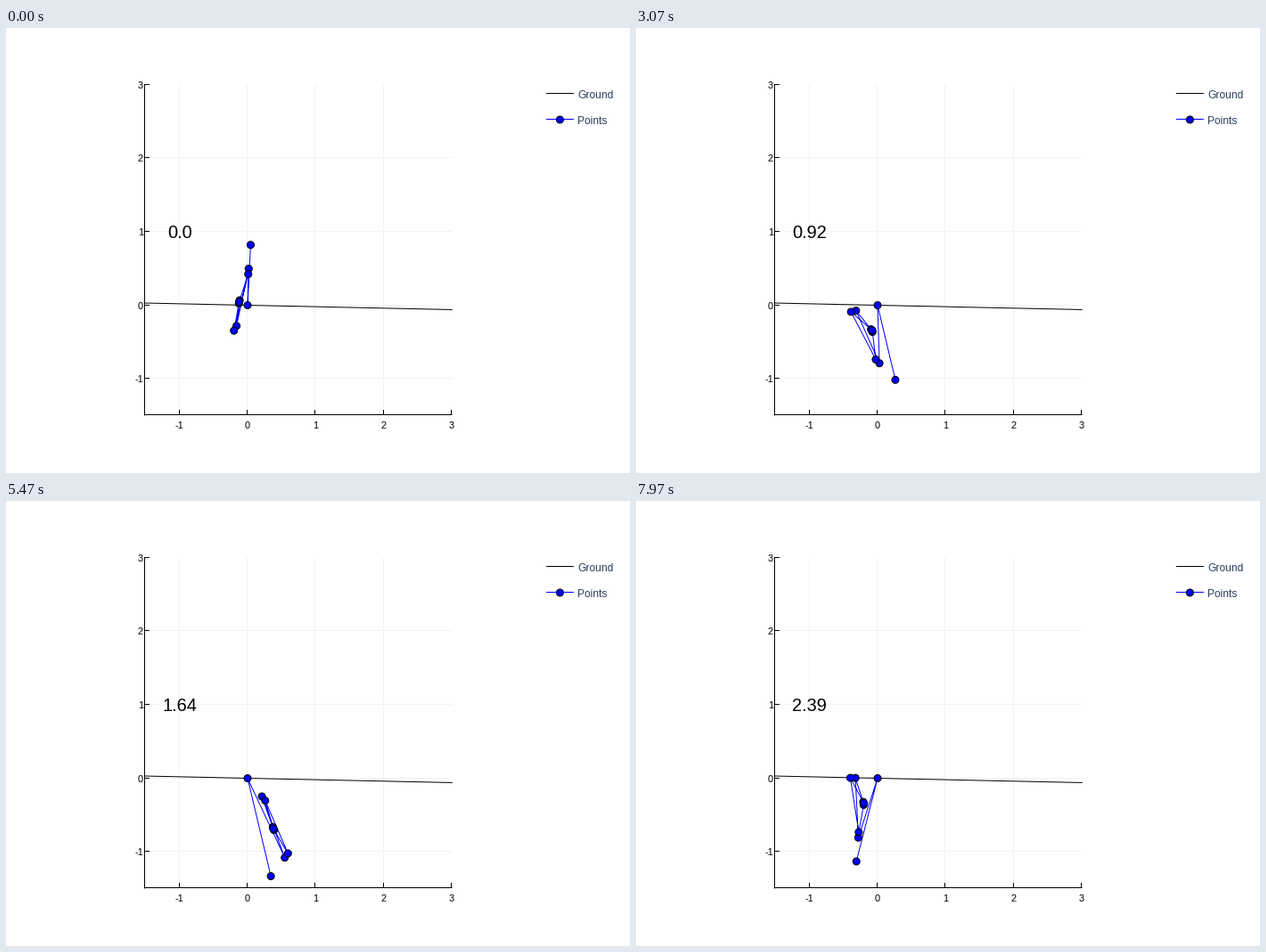
Animation, 700 px wide and 500 px high, one loop 8000 ms. Source, as a matplotlib script:

```python
import numpy as np
import matplotlib.pyplot as plt
from matplotlib.animation import FuncAnimation
from matplotlib.patches import Circle

W, H, DPI = 700, 500, 100
FRAMES, LOOP = 240, 8000
PT = 72 / DPI
LINK = 0.4
SHANK_MASS = 0.075   # distance of the shank mass from the knee
THIGH_MASS = 0.022   # distance of the thigh mass from the hip

plt.rcParams["font.family"] = "Liberation Sans"

# key poses: seconds -> degrees from straight down for
# stance shank, stance thigh, swing thigh, swing shank
POSES = {
    0.00: (-30, 169, 160.5, 175),
    0.40: (-36, 169, 56, 170.5),
    0.68: (-18, 138, -40, 112),
    0.92: (-77, 51, 7.5, 46),
    1.46: (-236, 22.5, 49.5, -27.5),
    1.82: (-420, 12.4, 27, -43.5),
    2.12: (-627.5, 2, 106, -35),
    2.39: (-810.7, 30, -11, -5),
}
KNOTS = np.array(list(POSES))
ANGLES = np.radians(list(POSES.values()))
SLOPES = np.gradient(ANGLES, KNOTS, axis=0)
SLOPES[0] = 0  # starts at rest


def angles_at(t):
    """Cubic Hermite blend between the key poses."""
    i = min(np.searchsorted(KNOTS, t, side="right"), len(KNOTS) - 1) - 1
    h = KNOTS[i + 1] - KNOTS[i]
    u = (t - KNOTS[i]) / h
    return ((1 + 2 * u) * (1 - u) ** 2 * ANGLES[i]
            + u * (1 - u) ** 2 * h * SLOPES[i]
            + u * u * (3 - 2 * u) * ANGLES[i + 1]
            + u * u * (u - 1) * h * SLOPES[i + 1])


def to_px(x, y):
    return 271 + 76.4 * np.asarray(x), 311.5 - 82.5 * np.asarray(y)


def crisp(v):
    """Centre of the pixel that a thin straight line fills."""
    return np.round(v) - 0.5


def walker(t):
    d1, d2, d3, d4 = [np.array((np.sin(a), -np.cos(a))) for a in angles_at(t)]
    foot = np.zeros(2)
    knee = foot + LINK * d1
    hip = knee + LINK * d2
    swing_knee = hip + LINK * d3
    swing_foot = swing_knee + LINK * d4
    pts = [
        swing_foot, foot,
        swing_knee + SHANK_MASS * d4, knee - SHANK_MASS * d1,
        hip - THIGH_MASS * d2, hip + THIGH_MASS * d3,
        swing_knee, knee, hip,
    ]
    return to_px(*np.array(pts).T)


fig = plt.figure(figsize=(W / DPI, H / DPI), dpi=DPI, facecolor="white")
ax = fig.add_axes([0, 0, 1, 1])
ax.set_xlim(0, W)
ax.set_ylim(H, 0)
ax.axis("off")


def line(xs, ys, color="black"):
    return ax.plot(xs, ys, color=color, lw=PT, snap=False)[0]


def dot(x=0, y=0):
    return ax.add_patch(Circle((x, y), 4, fc="blue", ec="black", lw=PT, zorder=3))


def label(x, y, s, px, color="black", ha="center"):
    return ax.text(x, y, s, fontsize=px * PT, color=color, ha=ha, va="baseline")


left, right, top, bottom = crisp(156), 500, 64, crisp(435)

for v in range(-1, 3):
    gx, gy = crisp(to_px(v, v))
    line([gx, gx], [top, bottom], "#f2f2f2")
    line([left, right], [gy, gy], "#f2f2f2")

line([left, left], [top, bottom + 0.5])
line([left, right], [bottom, bottom])
for v in range(-1, 4):
    x, y = to_px(v, v)
    gx, gy = crisp((x, y))
    line([gx, gx], [bottom - 5, bottom])
    line([left, left + 5], [gy, gy])
    label(x, 450, str(v), 11)
    label(154, y + 4, str(v), 11, ha="right")

ground_x = np.array([-1.5, 3])
line(*to_px(ground_x, -0.02 * ground_x))

LEGEND_X = 601.4
for y, name, color in ((73.5, "Ground", "black"), (102.5, "Points", "blue")):
    line([LEGEND_X + 5, LEGEND_X + 35], [y, y], color)
    label(LEGEND_X + 40, y + 5.5, name, 12, "#2a3f5f", "left")
dot(LEGEND_X + 20, 103)

body = line([], [], "blue")
dots = [dot() for _ in range(9)]
clock = label(194.8, 236, "0.0", 20)


def draw(i):
    t = round(i * 0.01, 2)
    xs, ys = walker(t)
    body.set_data(xs, ys)
    for d, x, y in zip(dots, xs, ys):
        d.center = x, y
    clock.set_text(str(t))
    return body, *dots, clock


anim = FuncAnimation(fig, draw, frames=FRAMES, interval=LOOP / FRAMES,
                     init_func=lambda: draw(0), repeat=True, repeat_delay=0)
plt.show()
```
